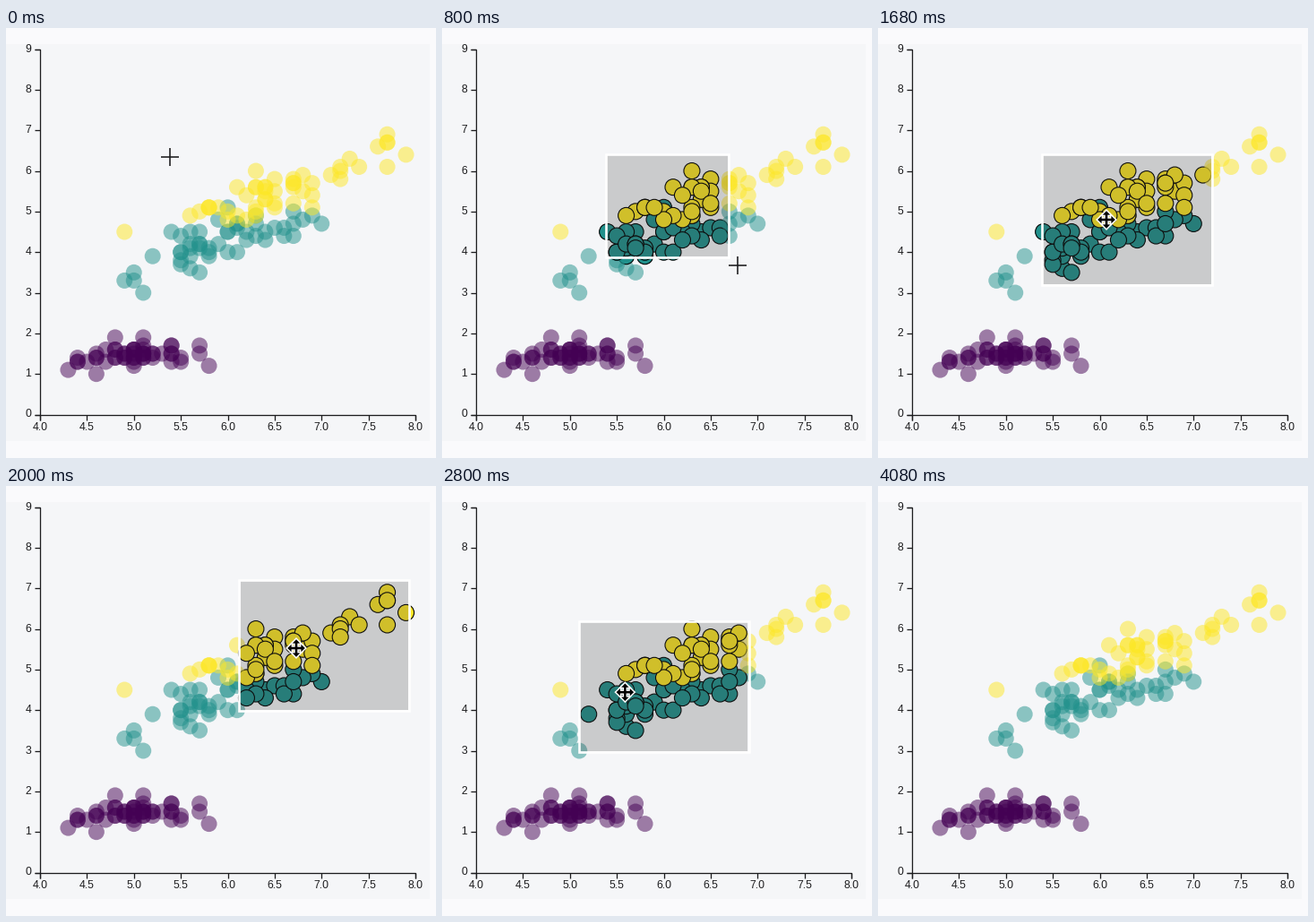
Recreate the animation shown at these times as a matplotlib script. Size 480x480 px, loop 4640 ms.

```python
import numpy as np
import matplotlib.pyplot as plt
from matplotlib.animation import FuncAnimation
from matplotlib.patches import Polygon, Rectangle

SIZE, DPI, STEP, FRAMES = 480, 100, 80, 58
PX = 72 / DPI
INK = "#1c1c1e"

# Flower measurements in tenths: x then y for each species.
SPECIES = [
    ("#440154",
     [51, 49, 47, 46, 50, 54, 46, 50, 44, 49, 54, 48, 48, 43, 58, 57, 54,
      51, 57, 51, 54, 51, 46, 51, 48, 50, 50, 52, 52, 47, 48, 54, 52, 55,
      49, 50, 55, 49, 44, 51, 50, 45, 44, 50, 51, 48, 51, 46, 53, 50],
     [14, 14, 13, 15, 14, 17, 14, 15, 14, 15, 15, 16, 14, 11, 12, 15, 13,
      14, 17, 15, 17, 15, 10, 17, 19, 16, 16, 15, 14, 16, 16, 15, 15, 14,
      15, 12, 13, 14, 13, 15, 13, 13, 13, 16, 19, 14, 16, 14, 15, 14]),
    ("#21918c",
     [70, 64, 69, 55, 65, 57, 63, 49, 66, 52, 50, 59, 60, 61, 56, 67, 56,
      58, 62, 56, 59, 61, 63, 61, 64, 66, 68, 67, 60, 57, 55, 55, 58, 60,
      54, 60, 67, 63, 56, 55, 55, 61, 58, 50, 56, 57, 57, 62, 51, 57],
     [47, 45, 49, 40, 46, 45, 47, 33, 46, 39, 35, 42, 40, 47, 36, 44, 45,
      41, 45, 39, 48, 40, 49, 47, 43, 44, 48, 50, 45, 35, 38, 37, 39, 51,
      45, 45, 47, 44, 41, 40, 44, 46, 40, 33, 42, 42, 42, 43, 30, 41]),
    ("#fde725",
     [63, 58, 71, 63, 65, 76, 49, 73, 67, 72, 65, 64, 68, 57, 58, 64, 65,
      77, 77, 60, 69, 56, 77, 63, 67, 72, 62, 61, 64, 72, 74, 79, 64, 63,
      61, 77, 63, 64, 60, 69, 67, 69, 58, 68, 67, 67, 63, 65, 62, 59],
     [60, 51, 59, 56, 58, 66, 45, 63, 58, 61, 51, 53, 55, 50, 51, 53, 55,
      67, 69, 50, 57, 49, 67, 49, 57, 60, 48, 49, 56, 58, 61, 64, 56, 51,
      56, 61, 56, 55, 48, 54, 56, 51, 51, 59, 57, 52, 50, 52, 54, 51]),
]

# Key points: time in ms, x, y
CORNER = [(160, 184, 142), (800, 319, 255), (1160, 371.5, 286)]
ORIGIN = [(1600, 184, 142), (1680, 184, 142), (2000, 261.5, 106),
          (2160, 265, 103), (2480, 232.5, 115), (3040, 116, 171)]
POINTER = [(0, 183, 144), (160, 183, 144), (800, 330, 265),
           (1120, 372, 287), (1200, 368, 285), (1520, 255, 214),
           (1680, 255, 214), (2000, 324, 181), (2160, 326, 178),
           (2480, 288, 193), (3000, 170, 244), (3200, 166, 180),
           (3440, 175, 136), (3840, 183, 144)]
CLEAR, LEAVE = 3440, 4080


def px(x):
    return 38 + (x - 4) * 104.75


def py(y):
    return 431.5 - y * 45.33


def glide(keys, t):
    """Smooth path through the keys, resting where the direction turns."""
    k = np.array(keys, float)
    ts, ps = k[:, 0], k[:, 1:]
    if t <= ts[0]:
        return ps[0]
    if t >= ts[-1]:
        return ps[-1]
    slope = np.diff(ps, axis=0) / np.diff(ts)[:, None]
    a, b = slope[:-1], slope[1:]
    prod = a * b
    total = np.where(prod > 0, a + b, 1)
    tang = np.zeros_like(ps)
    tang[1:-1] = np.where(prod > 0, 2 * prod / total, 0)
    i = np.searchsorted(ts, t, side="right") - 1
    h = ts[i + 1] - ts[i]
    u = (t - ts[i]) / h
    return ((2*u**3 - 3*u**2 + 1) * ps[i] + (u**3 - 2*u**2 + u) * h * tang[i]
            + (3*u**2 - 2*u**3) * ps[i + 1] + (u**3 - u**2) * h * tang[i + 1])


def four_arrows():
    arm = np.array([(1.3, -1.3), (1.3, -5.4), (4.2, -5.4), (0, -9.8),
                    (-4.2, -5.4), (-1.3, -5.4)])
    turn = np.array([(0, -1), (1, 0)])
    parts = []
    for _ in range(4):
        parts.append(arm)
        arm = arm @ turn
    return np.vstack(parts)


fig = plt.figure(figsize=(SIZE / DPI, SIZE / DPI), dpi=DPI,
                 facecolor="#fafafc")
ax = fig.add_axes([0, 0, 1, 1])
ax.set_xlim(0, SIZE)
ax.set_ylim(SIZE, 0)
ax.axis("off")
ax.add_patch(Rectangle((0, 18), 473, 443, fc="#f5f6f8", lw=0, zorder=0))


def line(xs, ys, width=1.3, z=1):
    return ax.plot(xs, ys, color=INK, lw=width * PX, zorder=z,
                   solid_capstyle="butt", solid_joinstyle="miter")[0]


def label(x, y, s, ha):
    ax.text(x, y, s, ha=ha, va="center", color=INK, fontsize=12.3 * PX,
            family="Liberation Sans")


line([32, 38, 38, 32], [py(9), py(9), py(0), py(0)])
line([px(4), px(4), px(8), px(8)], [437.5, 431.5, 431.5, 437.5])
for v in range(10):
    line([32, 38], [py(v)] * 2)
    label(28, py(v), str(v), "right")
for v in np.arange(4, 8.1, 0.5):
    line([px(v)] * 2, [431.5, 437.5])
    label(px(v), 446, f"{v:.1f}", "center")

X = px(np.concatenate([s[1] for s in SPECIES]) / 10)
Y = py(np.concatenate([s[2] for s in SPECIES]) / 10)
FILL = np.vstack([[plt.matplotlib.colors.to_rgba(s[0])] * len(s[1])
                  for s in SPECIES])
EDGE = np.tile(plt.matplotlib.colors.to_rgba("black"), (len(X), 1))

dots = ax.scatter(X, Y, s=(18 * PX) ** 2, linewidths=1.1 * PX, zorder=2)
shade = ax.add_patch(Rectangle((0, 0), 1, 1, fc="#3c3c3c", alpha=0.23,
                               lw=0, zorder=3))
frame = ax.add_patch(Rectangle((0, 0), 1, 1, fill=False, ec="white",
                               lw=2.6 * PX, joinstyle="miter", zorder=4))
cross = [line([], [], 1.6, 6) for _ in range(2)]
ARROWS = four_arrows()
halo = ax.add_patch(Polygon(ARROWS, fc="white", ec="white", lw=3 * PX,
                            zorder=5))
arrows = ax.add_patch(Polygon(ARROWS, fc="black", lw=0, zorder=6))


def brush(t):
    if not 160 < t < CLEAR:
        return None
    x, y = glide(ORIGIN, t)
    w, h = glide(CORNER, t) - np.array([184, 142])
    return x, y, w, h


def draw(i):
    t = i * STEP
    box = brush(t)
    picked = np.zeros(len(X), bool)
    for p in (shade, frame):
        p.set_visible(box is not None)
    if box:
        x, y, w, h = box
        picked = (X >= x) & (X <= x + w) & (Y >= y) & (Y <= y + h)
        shade.set_bounds(x, y, w, h)
        frame.set_bounds(x - 1.2, y - 1.2, w + 2.4, h + 2.4)
    face, edge = FILL.copy(), EDGE.copy()
    face[:, 3] = np.where(picked, 1, 0.5)
    edge[:, 3] = picked
    dots.set_facecolor(face)
    dots.set_edgecolor(edge)

    cx, cy = glide(POINTER, t)
    moving = 1280 <= t < 3280
    cross[0].set_data([cx - 10, cx + 10], [cy, cy])
    cross[1].set_data([cx, cx], [cy - 10, cy + 10])
    for c in cross:
        c.set_visible(t < LEAVE and not moving)
    for p in (halo, arrows):
        p.set_xy(ARROWS + [cx, cy])
        p.set_visible(moving)
    return [dots, shade, frame, *cross, halo, arrows]


anim = FuncAnimation(fig, draw, frames=FRAMES, interval=STEP, repeat=True,
                     repeat_delay=0, blit=False)
plt.show()
```
